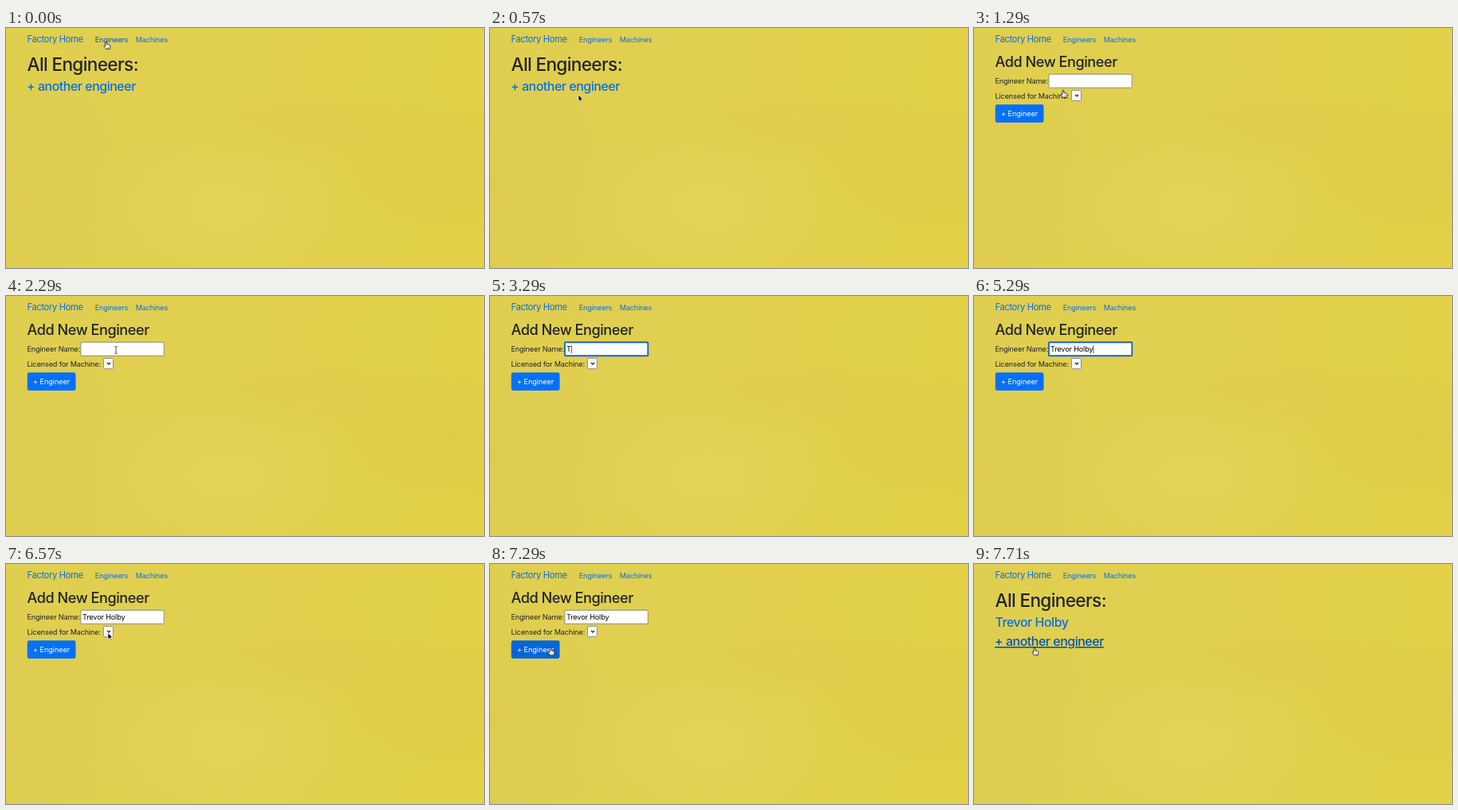
Animation, 600 px wide and 302 px high, one loop 8 s. Source, as an HTML page:

```html
<!DOCTYPE html>
<html lang="en">
<head>
<meta charset="utf-8">
<title>Factory engineers</title>
<style>
  html, body { margin: 0; width: 100%; height: 100%; overflow: hidden; }
  body {
    background:
      radial-gradient(ellipse 190px 120px at 270px 225px, #e5d55a99, #e5d55a00),
      radial-gradient(ellipse 150px 90px at 560px 175px, #dcc74899, #dcc74800),
      radial-gradient(ellipse 180px 50px at 390px 125px, #dfca4b88, #dfca4b00),
      radial-gradient(ellipse 150px 170px at 0 200px, #dcc95199, #dcc95100),
      linear-gradient(100deg, #e0ce50, #e2d04e 55%, #e2d147);
  }
  svg { display: block; width: 600px; height: 302px; }
  text {
    font-family: Inter, Roboto, sans-serif;
    font-optical-sizing: none;
    font-size: 9.1px;
    letter-spacing: -.015em;
    fill: #212529;
    white-space: pre;
  }
  .link { fill: #056fe6; }
  .hover { fill: #0056b3; text-decoration: underline; text-decoration-thickness: 1.2px; }
  .nav.hover { text-decoration: none; }
  .brand { font-size: 11.2px; letter-spacing: -.032em; }
  .h1, .h2, .h3 { font-weight: 500; letter-spacing: -.028em; }
  .h1 { font-size: 22.6px; }
  .h2 { font-size: 18.1px; letter-spacing: -.025em; }
  .h3 { font-size: 15.9px; }
  .field { fill: #fff; stroke: #767676; stroke-width: .8; }
  .field.focus { stroke: #1b65c6; stroke-width: 1.9; }
  #name { fill: #000; }
  #label { fill: #fff; letter-spacing: -.005em; }
  #button { fill: #0671f7; }
  #button.over { fill: #0566dc; }
  #button.focus { stroke: #338fe0; stroke-opacity: .55; stroke-width: 5; paint-order: stroke; }
  .pointer { stroke-linejoin: round; }
</style>
</head>
<body>
<svg viewBox="0 0 600 302">
  <text class="link brand" x="26.5" y="18">Factory Home</text>
  <text class="link nav" id="engineers" x="111.7" y="17.6">Engineers</text>
  <text class="link nav" x="162.7" y="17.6">Machines</text>

  <g id="list">
    <text class="h1" x="26.5" y="54">All Engineers:</text>
    <text class="link h3" id="entry" x="26.5" y="79">Trevor Holby</text>
    <text class="link h3" id="add" x="26" y="79">+ another engineer</text>
  </g>

  <g id="form">
    <text class="h2" x="26.5" y="49">Add New Engineer</text>
    <text x="26.5" y="69.7">Engineer Name:</text>
    <rect class="field" id="input" x="93.9" y="58.2" width="104.4" height="17" rx=".8"/>
    <text id="name" x="96" y="69.7"></text>
    <path id="caret" d="M0 62V72" stroke="#000" stroke-width=".7"/>
    <text x="26.5" y="88.5">Licensed for Machine:</text>
    <rect class="field" x="122.4" y="78.4" width="12" height="13.2" rx="1"/>
    <path d="M127 84l2 2 2-2" fill="none" stroke="#111" stroke-width="1.2"/>
    <rect id="button" x="26.7" y="96.3" width="60.8" height="22.7" rx="2.4"/>
    <text id="label" x="34" y="111">+ Engineer</text>
  </g>

  <g id="cursor">
    <path class="pointer" id="arrow" d="M0 0V8.2L1.9 6.5 3.1 9.3 4.4 8.7 3.2 6H5.7Z" stroke="#fff" stroke-width=".7"/>
    <g class="pointer" id="hand" stroke="#111" stroke-width=".8">
      <path fill="#fff" d="M-1 .8C-1-.4 .8-.4 .8 .8V3.5L3.8 4.1Q5.1 4.5 4.9 6L4.2 9.5H-.3L-3 6.2Q-3.3 4.8-1.9 5.1L-1 5.9Z"/>
      <path d="M1 7V8.6M2.5 7V8.6" stroke-width=".5"/>
    </g>
    <path id="beam" d="M-1.6-4.6Q0-4.6 0-3.6V3.6Q0 4.6-1.6 4.6M1.6-4.6Q0-4.6 0-3.6M0 3.6Q0 4.6 1.6 4.6" fill="none" stroke="#222" stroke-width=".8"/>
  </g>
</svg>
<script>
const LOOP = 8000, STEP = 1000 / 7, NAME = "Trevor Holby";
// step, x, y
const PATH = [
  [0, 126, 17], [1, 125, 20], [3, 113, 72], [4, 111, 84], [5, 111, 84], [6, 112, 78],
  [10, 112, 78], [14, 138, 68], [39, 140, 68], [41, 140, 68], [45, 128, 86.5],
  [47, 128, 86.5], [51, 76, 105.5], [56, 76, 105.5]
];
const $ = id => document.getElementById(id);
const show = (id, on) => $(id).style.display = on ? "" : "none";
const toggle = (id, name, on) => $(id).classList.toggle(name, on);
const between = (i, from, to) => i >= from && i < to;

function place(i) {
  const k = PATH.findIndex(p => p[0] > i);
  const [s, x, y] = PATH[k - 1], [e, u, v] = PATH[k];
  const f = (i - s) / (e - s), ease = f * f * (3 - 2 * f);
  return [x + (u - x) * ease, y + (v - y) * ease];
}

function pointerKind(i) {
  if (i < 2 || between(i, 6, 10) || i >= 50) return "hand";
  return between(i, 11, 43) ? "beam" : "arrow";
}

function draw(i) {
  const form = between(i, 9, 53), done = i >= 53;
  show("list", !form);
  show("form", form);
  show("entry", done);
  $("add").setAttribute("y", done ? 103 : 79);
  toggle("add", "hover", between(i, 6, 9) || i >= 54);
  toggle("engineers", "hover", i < 2);

  const focus = between(i, 17, 43);
  const typed = i < 23 ? 0 : Math.min(NAME.length, 1 + Math.floor((i - 23) * 11 / 14));
  $("name").textContent = NAME.slice(0, typed);
  const width = form && typed ? $("name").getComputedTextLength() : 0;
  $("caret").setAttribute("transform", `translate(${96.5 + width})`);
  show("caret", focus && (i < 21 || i >= 23));
  toggle("input", "focus", focus);
  toggle("button", "over", between(i, 50, 53));
  toggle("button", "focus", i === 52);

  const kind = pointerKind(i);
  for (const id of ["arrow", "hand", "beam"]) show(id, id === kind);
  show("cursor", !between(i, 22, 39));
  $("cursor").setAttribute("transform", `translate(${place(i)})`);
}

const start = performance.now();
function tick() {
  const t = (performance.now() - start) % LOOP;
  draw(Math.min(55, Math.floor((t + 5) / STEP)));
  requestAnimationFrame(tick);
}
tick();
</script>
</body>
</html>
```
